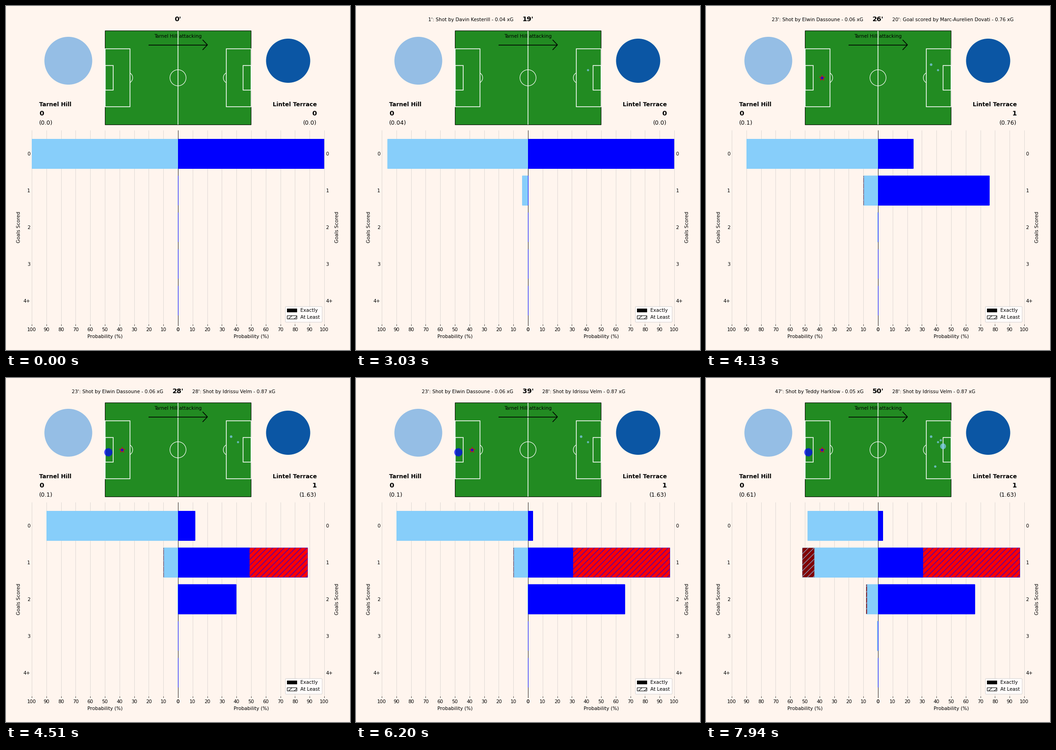
A matplotlib script that plays this animation: 748 px wide and 748 px high, repeating every 8 s.

```python
import matplotlib.pyplot as plt
import numpy as np
from matplotlib.animation import FuncAnimation
from matplotlib.patches import Arc, Circle, Patch, Rectangle

SIZE, DPI = 748, 74.8
STEP, LOOP = 20, 8000           # ms
HOLD, SUB, SUBS = 160, 30, 5    # quiet minute; sub-steps of a minute with shots
LAST_MINUTE = 50

LEFT, MID, RIGHT = 56.1, 374, 691.9
SPAN = RIGHT - MID
BASE = MID + 0.4                # bars start on the centre of the axis line
TOP, BOTTOM = 270.4, 691.8
ROW = (BOTTOM - TOP) / 5.28
PITCH = (215.6, 53.9, 317.4, 204.4)

plt.rcParams["font.family"] = "DejaVu Sans"

HOME = dict(name="Tarnel Hill", color="lightskyblue", alt="#800000", sign=-1)
AWAY = dict(name="Lintel Terrace", color="blue", alt="red", sign=1)

# minute, player, chance, x, y, goal
HOME["shots"] = [
    (1, "Davin Kesterill", 0.0393, 504.5, 139, False),
    (23, "Elwin Dassoune", 0.064, 489.5, 127, False),
    (40, "Teddy Harklow", 0.413, 515, 148, False),
    (40, "Davin Kesterill", 0.04, 510.5, 134.5, False),
    (47, "Teddy Harklow", 0.05, 498.5, 192, False),
]
AWAY["shots"] = [
    (20, "Marc-Aurelien Dovati", 0.76, 251.7, 156, True),
    (28, "Idrissu Velm", 0.87, 222.3, 160.5, False),
]

fig = plt.figure(figsize=(SIZE / DPI, SIZE / DPI), dpi=DPI, facecolor="seashell")
ax = fig.add_axes([0, 0, 1, 1])
ax.set(xlim=(0, SIZE), ylim=(SIZE, 0))
ax.axis("off")


def label(x, y, s="", size=10, ha="center", va="baseline", **kw):
    return ax.text(x, y, s, fontsize=size, ha=ha, va=va, zorder=6, **kw)


def line(xs, ys, color, lw, z):
    ax.plot(xs, ys, color=color, lw=lw, zorder=z, solid_capstyle="butt")


def box(x, y, w, h, **kw):
    return ax.add_patch(Rectangle((x, y), w, h, snap=False, **kw))


def draw_pitch():
    x, y, w, h = PITCH
    cy = y + h / 2
    box(x, y, w, h, fc="forestgreen", ec="black", lw=1, zorder=1)
    white = dict(fc="none", ec="white", zorder=2)
    for depth, half in ((54, 63), (17.5, 26.7)):
        for bx in (x, x + w - depth):
            box(bx, cy - half, depth, 2 * half, lw=1.5, **white)
    line([MID, MID], [y, y + h], "white", 1.5, 2)
    ax.add_patch(Circle((MID, cy), 17.5, lw=1.1, **white))
    for side in (-1, 1):
        cx = MID + side * 110.5
        turn = 0 if side < 0 else 180
        ax.add_patch(Arc((cx, cy), 24, 24, angle=turn, theta1=-60, theta2=60,
                         ec="white", lw=1.1, zorder=2))
    label(MID - 0.5, 69, HOME["name"] + " attacking")
    line([310, 438], [84.5, 84.5], "black", 1.5, 3)
    line([427.5, 438, 427.5], [73.5, 84.5, 95.5], "black", 1.5, 3)


def draw_chart():
    for side, edge in ((-1, LEFT), (1, RIGHT)):
        xs = MID + side * SPAN * np.arange(11) / 10
        ax.vlines(xs, TOP, BOTTOM, color="#b0b0b0", alpha=0.5, lw=0.8, zorder=0, snap=True)
        ax.vlines(xs, BOTTOM, BOTTOM + 3.64, color="black", lw=0.8, zorder=5, snap=True)
        for i, x in enumerate(xs):
            label(x, BOTTOM + 7.3, str(10 * i), va="top")
        ha = "right" if side < 0 else "left"
        for i, s in enumerate(("0", "1", "2", "3", "4+")):
            label(edge + side * 3.64, TOP + ROW * (i + 0.64), s, ha=ha, va="center_baseline")
        label((MID + edge) / 2, 713.9, "Probability (%)", va="top")
        label(edge + side * 23.1, (TOP + BOTTOM) / 2, "Goals Scored", rotation=90,
              rotation_mode="anchor", va="bottom" if side < 0 else "top")
    line([MID, MID], [TOP, BOTTOM], "black", 0.8, 2.5)
    ax.legend(handles=[Patch(fc="black", ec="black", label="Exactly"),
                       Patch(fc="white", ec="black", hatch="//", label="At Least")],
              loc="lower right", fontsize=10,
              bbox_to_anchor=(0.5, 1 - BOTTOM / SIZE, 0.425, (BOTTOM - TOP) / SIZE)
              ).set_zorder(7)


def add_team(team):
    side, color = team["sign"], team["color"]
    ha, x = ("left", 72) if side < 0 else ("right", 675.7)
    label(x, 217.8, team["name"], 12, ha, weight="bold")
    team["score"] = label(x, 238.3, size=14, ha=ha, weight="bold")
    team["total"] = label(x, 258, size=12, ha=ha)
    team["event"] = label(342.3 if side < 0 else 405.3, 33.2,
                          ha="right" if side < 0 else "left")

    clip = Rectangle((min(MID, MID + side * SPAN), TOP), SPAN, BOTTOM - TOP,
                     transform=ax.transData)
    team["bars"] = []
    for i in range(5):
        y = TOP + ROW * (i + 0.24)
        row = [box(BASE, y, 0, 0.8 * ROW, fc=color, ec=color, lw=1, zorder=3)
               for _ in range(2)]
        row.append(box(BASE, y, 0, 0.8 * ROW, fc=team["alt"], ec=color, lw=0,
                       hatch="//", zorder=4))
        for bar in row:
            bar.set_clip_path(clip)
        team["bars"].append(row)

    team["dots"] = []
    for minute, _, p, sx, sy, goal in team["shots"]:
        if goal:
            style = dict(s=150, marker="*", edgecolors=team["alt"], lw=1, alpha=0.85)
        else:
            style = dict(s=(np.sqrt(300 * p) + 1) ** 2, lw=0, alpha=0.7)
        team["dots"].append((minute, ax.scatter(sx, sy, c=color, zorder=4, **style)))


def goal_odds(shots):
    odds = np.array([1.0])
    for shot in shots:
        odds = np.convolve(odds, [1 - shot[2], shot[2]])
    odds = np.pad(odds, (0, 6))
    return np.append(odds[:4], odds[4:].sum())


def set_team(team, minute, part):
    past = [s for s in team["shots"] if s[0] <= minute]
    before = [s for s in past if s[0] < minute]
    exact = (1 - part) * goal_odds(before) + part * goal_odds(past)
    at_least = exact[::-1].cumsum()[::-1]
    at_least[0] = exact[0]

    scale = SPAN * team["sign"]
    for (outer, inner, rest), e, a in zip(team["bars"], exact, at_least):
        outer.set_width(scale * a)
        inner.set_width(scale * e)
        rest.set_x(BASE + scale * e)
        rest.set_width(scale * (a - e))
        rest.set_visible(a - e > 1e-4)

    for when, dot in team["dots"]:
        dot.set_visible(when <= minute)
    team["score"].set_text(str(sum(s[5] for s in past)))
    team["total"].set_text(f"({round(float(sum(s[2] for s in past)), 2)})")
    text = ""
    if past:
        when, who, p, _, _, goal = past[-1]
        text = f"{when}': {'Goal scored' if goal else 'Shot'} by {who} - {p:.2f} xG"
    team["event"].set_text(text)


def make_timeline():
    busy = {s[0] for team in (HOME, AWAY) for s in team["shots"]}
    t, steps = 0, []
    for minute in range(LAST_MINUTE + 1):
        if minute in busy:
            for k in range(1, SUBS + 1):
                steps.append((t, minute, k / SUBS))
                t += SUB
        else:
            steps.append((t, minute, 1.0))
            t += HOLD
    return steps


draw_pitch()
draw_chart()
ax.add_patch(Circle((135.5, 119), 52, fc="#95bee5", lw=0))
ax.add_patch(Circle((613.5, 119), 48, fc="#0b56a4", lw=0))
add_team(HOME)
add_team(AWAY)
clock = label(MID, 33.2, size=14, weight="bold")

timeline = make_timeline()
starts = [step[0] for step in timeline]


def update(i):
    t = i * STEP + STEP / 2
    _, minute, part = timeline[np.searchsorted(starts, t, side="right") - 1]
    clock.set_text(f"{minute}'")
    set_team(HOME, minute, part)
    set_team(AWAY, minute, part)
    return []


anim = FuncAnimation(fig, update, frames=LOOP // STEP, interval=STEP,
                     init_func=lambda: update(0), repeat=True, repeat_delay=0)
plt.show()
```
